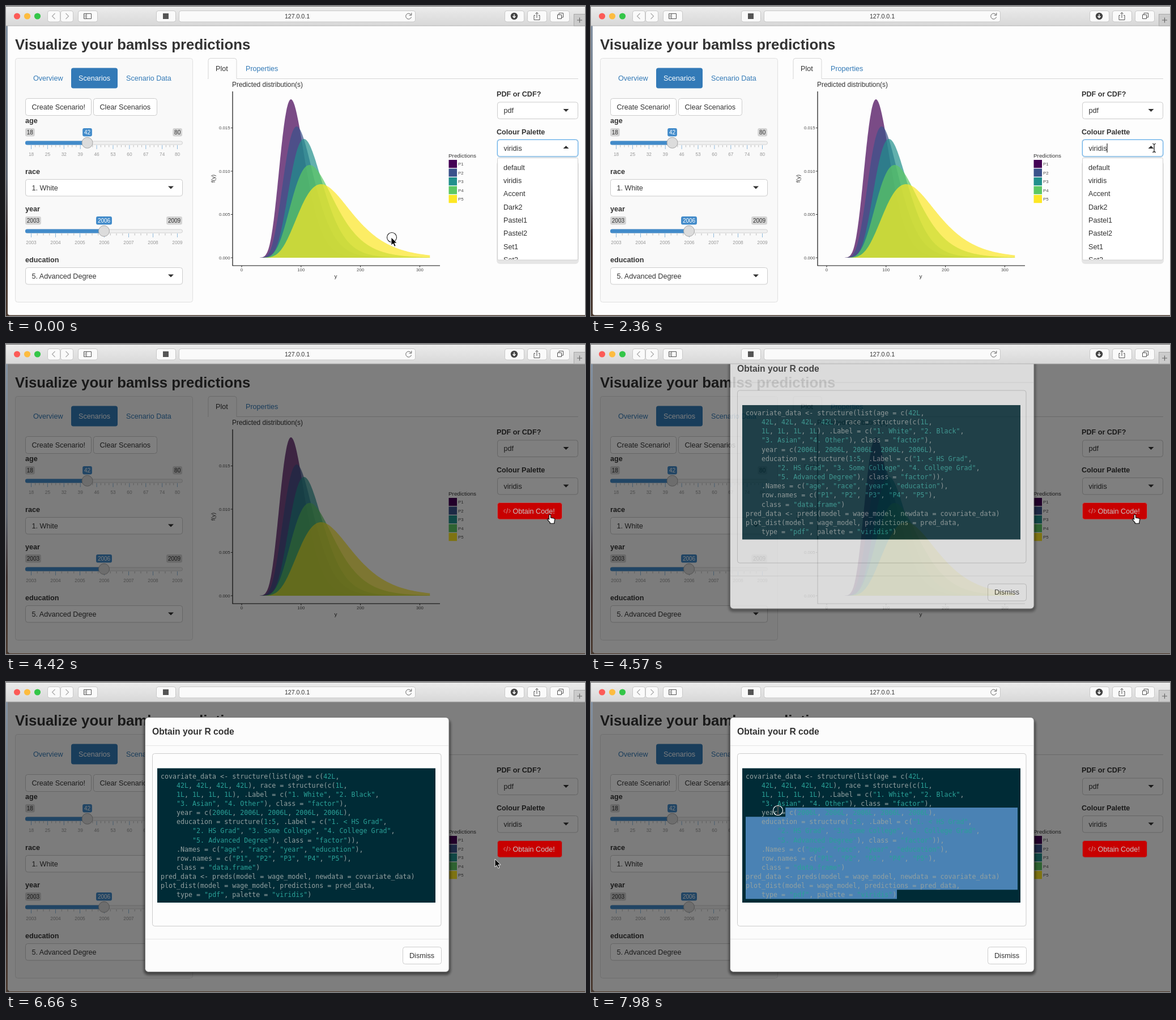
An HTML page for the animation above (8 s loop, 1022 px wide and 548 px high).

```html
<!DOCTYPE html>
<html lang="en">
<head>
<meta charset="utf-8">
<title>Prediction app</title>
<style>
html, body { margin: 0; width: 100%; height: 100%; overflow: hidden; background: #fdfdfd; }
svg { display: block; width: 1022px; height: 548px; font: 12.6px "Liberation Sans", Arial, sans-serif; fill: #333; }
.b { font-weight: bold; }
.m { text-anchor: middle; }
.link { fill: #337ab7; }
.white { fill: #fff; }
.code { font: 11.65px "DejaVu Sans Mono", monospace; fill: #93a1a1; }
.code tspan { fill: #2aa198; }
.tick { font-size: 8.3px; fill: #999; text-anchor: middle; }
.axis { font-size: 7.8px; fill: #4d4d4d; }
#obtain { fill: #fff; stroke: none; }
#obtain rect { fill: #f00; stroke: #ccc; }
#obtain path { stroke: #ffc4c4; }
#obtain.dim { fill: #c8c8c8; }
#obtain.dim rect { fill: #c80000; stroke: #866; }
#obtain.dim path { stroke: #d09c9c; }
#obtain.hover rect { stroke: #a66; }
</style>
</head>
<body>
<svg id="stage" viewBox="0 0 1022 548"></svg>
<script>
const LOOP = 8000;
const rect = (x, y, w, h, fill, stroke = 'none', r = 0, more = '') =>
  `<rect x="${x + .5}" y="${y + .5}" width="${w}" height="${h}" rx="${r}" fill="${fill}" stroke="${stroke}" ${more}/>`;
const block = (x, y, w, h, fill, r = 0) => rect(x - .5, y - .5, w, h, fill, 'none', r);
const text = (x, y, s, cls = '', size = '') =>
  `<text x="${x}" y="${y}" class="${cls}"${size && ` style="font-size:${size}px"`}>${s}</text>`;
const line = (d, stroke, w = 1, more = '') => `<path d="${d}" fill="none" stroke="${stroke}" stroke-width="${w}" ${more}/>`;
const dot = (x, y, r, fill, stroke = 'none') => `<circle cx="${x}" cy="${y}" r="${r}" fill="${fill}" stroke="${stroke}"/>`;
const group = (id, s) => `<g id="${id}">${s}</g>`;
const range = (n, f) => Array.from({ length: n }, (_, i) => f(i)).join('');

const button = (x, y, w, h, label, tx) => rect(x, y, w, h, '#fff', '#ccc', 4) + text(tx, y + 19.7, label);
const select = (x, y, w, label) => rect(x, y, w, 29.5, '#fff', '#ccc', 4) + text(x + 11.5, y + 19.5, label);
const down = (x, y) => `<path d="M${x - 5} ${y}h10l-5 5z"/>`;

function slider(y, min, now, max, x, labels, step, small) {
  const tag = (cx, s, fill, cls) => {
    const w = s.length * 5.6 + 5.5;
    return block(cx - w / 2, y, w, 14.5, fill, 3) + text(cx, y + 11, s, 'm ' + cls, 10);
  };
  const edge = min.length * 2.8 + 2.75, last = 302.5;
  const at = i => Math.min(44.5 + i * step, last);
  return tag(34 + edge, min, '#d3d3d3') + tag(311 - edge, max, '#d3d3d3') + tag(x, now, '#428bca', 'white')
    + rect(34, y + 22.5, 277, 6, '#f0f0f0', '#d2d2d2', 3) + block(34, y + 22.5, x - 34, 7, '#428bca', 3)
    + labels.map((s, i) => line(`M${at(i)} ${y + 30}v7`, '#8fb9dc') + text(at(i), y + 49, s, 'tick')
      + (i < labels.length - 1 ? range(small - 1, k =>
        line(`M${at(i) + (at(i + 1) - at(i)) * (k + 1) / small} ${y + 30}v3.5`, '#bbb')) : '')).join('')
    + dot(x, y + 25.8, 9.5, '#dcdcdc', '#a5a5a5');
}

// Log-normal curves: mode, peak height in px, spread
const curves = [[83, 280, .254, '#440154'], [92.6, 232, .274, '#3b528b'], [105, 210, .267, '#21908c'],
  [114.5, 164, .31, '#5dc863'], [133.6, 130, .332, '#fde725']];
const density = ([mode, peak, spread, fill]) => {
  let d = 'M447.4 445';
  for (let v = 30; v <= 317.5; v++)
    d += `L${(416 + v * 1.048).toFixed(1)} ${(445 - peak * Math.exp(-(Math.log(v / mode) ** 2) / (2 * spread ** 2))).toFixed(2)}`;
  return `<path d="${d}V445z" fill="${fill}" fill-opacity=".7"/>`;
};
const plot = text(399, 143, 'Predicted distribution(s)', '', 11.9)
  + curves.map(density).join('')
  + line('M400 151V459H766', '#111', 1.2)
  + range(4, i => {
    const x = 416 + i * 104.8, y = 445 - i * 76.5;
    return line(`M${x} 459v3M400 ${y}h-3`, '#333') + text(x, 469.3, i * 100, 'axis m')
      + `<text x="395.5" y="${y + 2.8}" class="axis" text-anchor="end">${(i * .005).toFixed(3)}</text>`;
  })
  + text(582, 481, 'y', 'm', 9.9)
  + `<text transform="translate(369 305) rotate(-90)" class="m" style="font-size:9.9px">f(y)</text>`
  + text(781, 268.3, 'Predictions', '', 9.9)
  + curves.map((c, i) => block(781.5, 272 + i * 15.5, 14.5, 14.2, c[3]) + text(798, 282.3 + i * 15.5, 'P' + (i + 1), 'axis')).join('');

const sidebar = rect(16, 92, 313, 431, '#f9f9f9', '#e0e0e0', 4)
  + text(48, 132, 'Overview', 'link') + block(115, 109.5, 82, 36, '#337ab7', 4)
  + text(128, 132, 'Scenarios', 'white') + text(212, 132, 'Scenario Data', 'link')
  + button(34, 163, 116, 30, 'Create Scenario!', 45.5) + button(154, 163, 112, 30, 'Clear Scenarios', 165.5)
  + text(34, 207, 'age', 'b') + slider(216, '18', '42', '80', 143.5, [18, 25, 32, 39, 46, 53, 60, 67, 74, 80], 28.9, 4)
  + text(34, 297, 'race', 'b') + select(34, 306, 277, '1. White') + down(291, 318.5)
  + text(34, 363, 'year', 'b') + slider(372, '2003', '2006', '2009', 173, [2003, 2004, 2005, 2006, 2007, 2008, 2009], 43, 4)
  + text(34, 453, 'education', 'b') + select(34, 462, 277, '5. Advanced Degree') + down(291, 474.5);

const controls = text(866, 160, 'PDF or CDF?', 'b') + select(867, 169.5, 142, 'pdf') + down(988.5, 182)
  + text(866, 227, 'Colour Palette', 'b') + select(867, 236, 142, 'viridis')
  + group('closed', down(988.5, 248.5))
  + group('open', rect(866, 235, 144, 31.5, 'none', '#66afe9', 5, 'stroke-opacity=".35"')
    + rect(867, 236, 142, 29.5, 'none', '#66afe9', 4) + '<path d="M983.5 252h10l-5-5z"/>'
    + block(866, 274, 145, 182, '#e6e6e6', 6) + rect(867, 268, 142, 180.5, '#fff', '#d0d0d0', 2)
    + '<clipPath id="list"><path d="M868 268h141v180h-141z"/></clipPath><g clip-path="url(#list)">'
    + ['default', 'viridis', 'Accent', 'Dark2', 'Pastel1', 'Pastel2', 'Set1', 'Set2']
      .map((s, i) => text(878, 289.7 + i * 23.3, s)).join('') + '</g>')
  + group('caret', block(910.5, 243, 1, 16, '#000'));

const obtain = group('obtain', rect(867, 280, 114, 29.5, '', '', 4)
  + text(894.5, 299.7, 'Obtain Code!')
  + line('M881.5 292l-3 3.2l3 3.2M887.5 292l3 3.2l-3 3.2M885.5 290.5l-2 9', ''));

const code = `covariate_data <- structure(list(age = c(42L,
    42L, 42L, 42L, 42L), race = structure(c(1L,
    1L, 1L, 1L, 1L), .Label = c("1. White", "2. Black",
    "3. Asian", "4. Other"), class = "factor"),
    year = c(2006L, 2006L, 2006L, 2006L, 2006L),
    education = structure(1:5, .Label = c("1. < HS Grad",
        "2. HS Grad", "3. Some College", "4. College Grad",
        "5. Advanced Degree"), class = "factor")),
    .Names = c("age", "race", "year", "education"),
    row.names = c("P1", "P2", "P3", "P4", "P5"),
    class = "data.frame")
pred_data <- preds(model = wage_model, newdata = covariate_data)
plot_dist(model = wage_model, predictions = pred_data,
    type = "pdf", palette = "viridis")`.split('\n');
const CHAR = 7.013, ROW = 16.15;
const codeLine = (s, i) => {
  const body = s.trim().replace(/</g, '&lt;').replace(/"[^"]*"|\b\d+L?\b/g, '<tspan>$&</tspan>');
  return text(273 + s.search(/\S/) * CHAR, 170.5 + i * ROW, body, 'code');
};
const modal = group('modal', '<g filter="url(#soft)">' + block(243, 66, 542, 452, 'rgba(0,0,0,.45)', 8) + '</g>'
  + rect(245, 62, 536.5, 450, '#fcfcfc', '#777', 6)
  + text(258, 93, 'Obtain your R code', 'b', 15.7)
  + line('M246 112.5h535M246 454.5h535', '#e5e5e5')
  + rect(258, 126, 509.5, 305, '#fdfdfd', '#ccc', 4) + block(267, 152.5, 491, 237.5, '#002b36')
  + '<path id="selection" fill="#4a82b4"/>' + code.map(codeLine).join('')
  + button(700, 468, 68, 30, 'Dismiss', 712));

const tool = (x, w) => rect(x, 8, w, 19.5, '#fafafa', '#c8c8c8', 3.5);
const toolbar = block(0, 0, 1022, 35, 'url(#bar)') + block(0, 0, 1022, 1, '#666') + block(0, 34.5, 1022, 1, '#b4b4b4')
  + dot(19.5, 18, 5.6, '#fc5b57') + dot(37.5, 18, 5.6, '#fdbc40') + dot(55.5, 18, 5.6, '#34c648')
  + tool(73, 22) + tool(96, 22) + tool(127, 34) + tool(265, 34) + tool(305, 417) + tool(880, 34) + tool(920, 34) + tool(960, 34)
  + line('M86.5 13l-5 5l5 5M105.5 13l5 5l-5 5', '#aaa', 1.2)
  + line('M137.5 13.5h13v9h-13zM142 13.5v9M139 16h1.5M139 18h1.5M139 20h1.5', '#555')
  + block(277, 13, 10, 10, '#555')
  + text(514, 22, '127.0.0.1', 'm', 10.6)
  + line('M715.2 16a5 5 0 1 0 .3 3.5M715.8 12v4.3h-4.3', '#666')
  + dot(897, 18, 6.2, '#444') + line('M897 14.5v6M894.5 18l2.5 2.8l2.5-2.8', '#fff', 1.4)
  + line('M934 16.5h-2v8h10v-8h-2M937 21v-9.5M934.5 14l2.5-2.7l2.5 2.7', '#555')
  + line('M973.5 15.5h7v7h-7zM976 15.5v-3h7.5v7.5h-3', '#555')
  + rect(1002, 14, 24, 20.5, '#cbcbcb', '#aaa') + line('M1008 25h9M1012.5 20.5v9', '#666', 1.2);

const BEAM = 'M-3-7.5q2.5 0 3 1.5q.5-1.5 3-1.5M0-6v12M-3 7.5q2.5 0 3-1.5q.5 1.5 3 1.5';
const cursor = group('cursor', '<circle id="ring" r="8.5" fill="none" stroke-width="1.1"/>'
  + '<path id="arrow" d="M-1 0v14l3.3-3 2.3 5.2 2.4-1-2.3-5.2h4.5z" fill="#000" stroke="#fff" stroke-width=".9"/>'
  + group('beam', line(BEAM, '#fff', 2.4, 'stroke-opacity=".5"') + line(BEAM, '#111', 1.2))
  + '<path id="hand" d="M-2.5 8V1a1.5 1.5 0 0 1 3 0v4l6 1.2q1.5.5 1.3 2l-1 5v2h-7.5v-1.5l-4.5-5q-.8-1.5.8-1.9z" fill="#fff" stroke="#000" stroke-width="1.1"/>');

document.getElementById('stage').innerHTML = `<defs>
  <linearGradient id="bar" x2="0" y2="1"><stop stop-color="#ececec"/><stop offset="1" stop-color="#d8d8d8"/></linearGradient>
  <linearGradient id="desk" x2="0" y2="1"><stop stop-color="#8a9aac"/><stop offset=".55" stop-color="#5d6470"/>
    <stop offset=".75" stop-color="#3a2c2a"/><stop offset="1" stop-color="#4c3c32"/></linearGradient>
  <filter id="soft"><feGaussianBlur stdDeviation="2.2"/></filter></defs>`
  + block(0, 0, 1022, 548, 'url(#desk)') + block(3, 20, 1022, 526.5, '#fdfdfd', 4)
  + text(16, 77, 'Visualize your bamlss predictions', 'b', 25.8)
  + sidebar
  + line('M356 128.5h1V96.5a4 4 0 0 1 4-4h42a4 4 0 0 1 4 4V128.5H1010', '#d5d5d5')
  + text(370, 115, 'Plot') + text(423, 115, 'Properties', 'link')
  + plot + controls
  + group('dim', block(3, 35, 1019, 511.5, 'rgba(0,0,0,.5)')) + obtain + modal + toolbar + cursor;

// The picture updates in short bursts: first change, last change, count
const steps = [0];
for (const [a, b, n] of [[150, 1180, 8], [1480, 2500, 8], [2650, 2650, 1], [2940, 3820, 7], [4270, 4860, 5], [6660, 7250, 5], [7550, 7980, 4]])
  for (let k = 0; k < n; k++) steps.push(Math.floor(a + k * (b - a) / Math.max(n - 1, 1)));

const path = [[0, 681, 409], [300, 690, 400], [740, 760, 380], [1180, 828, 372], [1400, 828, 372], [1770, 872, 290],
  [2060, 960, 262], [2210, 994, 251], [2800, 994, 251], [3820, 961, 302], [6600, 961, 302], [6660, 864, 313],
  [6810, 763, 322], [7100, 590, 370], [7250, 563, 386], [7550, 563, 386], [7980, 330, 227]];
function pointer(t) {
  const i = Math.max(1, path.findIndex(p => p[0] >= t));
  const [a, b] = [path[i - 1], path[i]], f = (t - a[0]) / (b[0] - a[0]);
  return [a[1] + (b[1] - a[1]) * f, a[2] + (b[2] - a[2]) * f];
}

const el = id => document.getElementById(id);
const show = (id, on) => { el(id).style.display = on ? '' : 'none'; };

function draw(now) {
  const t = now % LOOP, s = steps.findLast(v => v <= t);
  const open = s < 2500, dim = s > 4300;
  show('open', open);
  show('closed', !open);
  show('caret', open && s >= 430 && (s - 430) % 960 < 480);
  show('dim', dim);

  const [x, y] = pointer(s);
  const over = (a, b, c, d) => x >= a && x <= c && y >= b && y <= d;
  const hand = !open && over(867, 280, 981, 310);
  const beam = open ? over(867, 236, 1009, 266) : dim && over(267, 152, 758, 390);
  show('obtain', !open);
  el('obtain').classList.toggle('dim', dim);
  el('obtain').classList.toggle('hover', hand);

  const p = Math.min(1, Math.max(0, (s - 4417) / 400));
  show('modal', p > 0);
  el('modal').setAttribute('transform', `translate(0 ${-112 * (1 - p) ** 2})`);
  el('modal').style.opacity = Math.min(1, p * 2);

  const k = s > 7600 ? Math.round((s - 7550) / 143.3) : 0;
  const top = r => 157.4 + r * ROW, row = 13 - 3 * k, left = 273 + (40 - 10 * k) * CHAR;
  el('selection').setAttribute('d', k
    ? `M${left} ${top(row)}H753V${top(13)}H540V${top(14)}H273V${top(row + 1)}H${left}z` : '');

  el('cursor').setAttribute('transform', `translate(${x} ${y})`);
  show('hand', hand);
  show('beam', beam);
  show('arrow', !hand && !beam);
  show('ring', s === 0 || s === 2500 || s === 4270 || s >= 7550);
  el('ring').setAttribute('stroke', s > 7000 ? '#fff' : '#222');
}

const start = performance.now();
function tick() {
  draw(performance.now() - start);
  requestAnimationFrame(tick);
}
tick();
</script>
</body>
</html>
```
